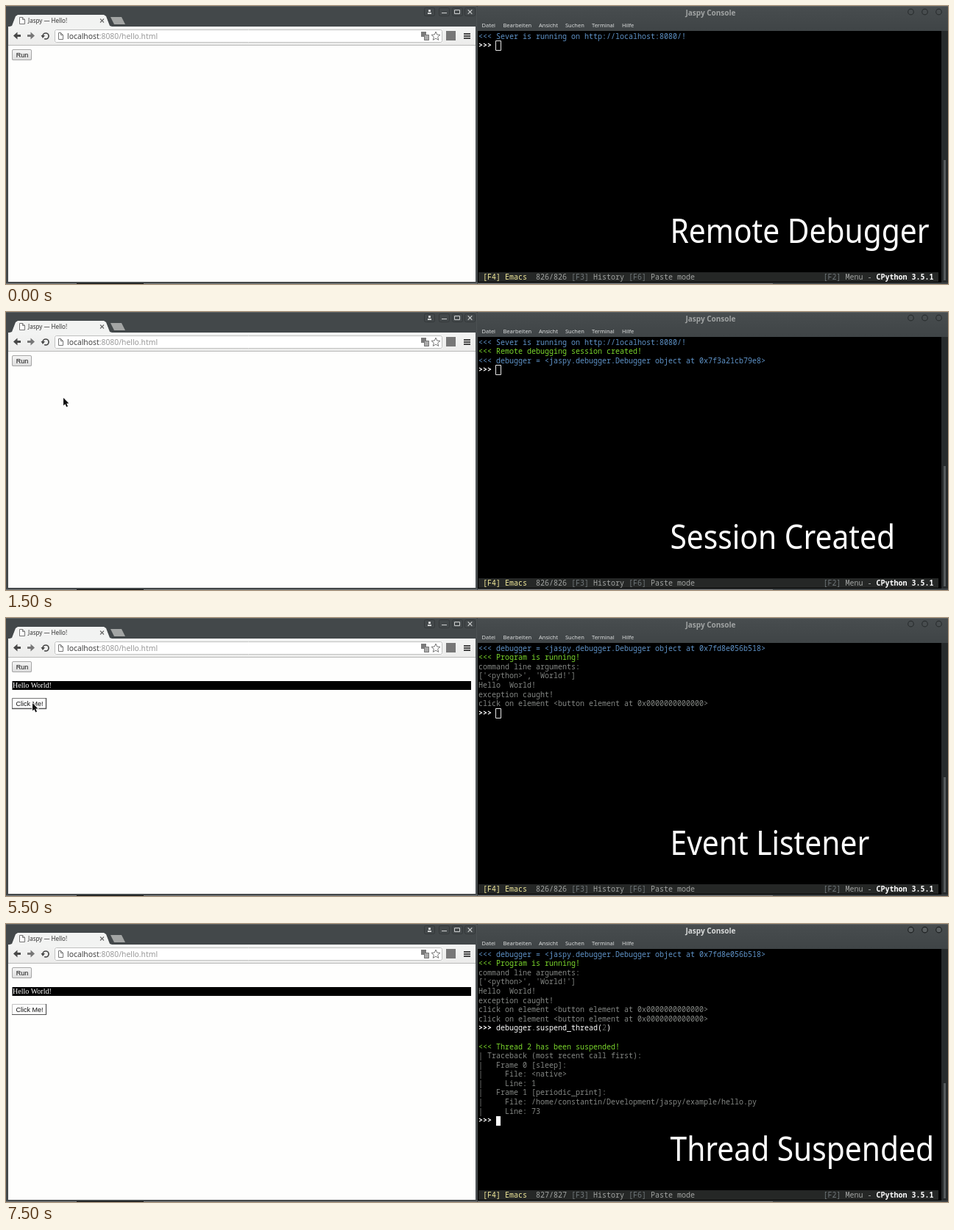
Recreate the animation shown at these times as an HTML page with a canvas. Size 1280 by 379 pixels, loop 8000 ms.

```html
<!DOCTYPE html>
<html lang="en">
<head>
<meta charset="utf-8">
<title>Jaspy remote debugger</title>
<style>
  html, body { margin: 0; width: 100%; height: 100%; overflow: hidden; background: #000; }
  canvas { display: block; width: 1280px; height: 379px; }
</style>
</head>
<body>
<canvas id="stage" width="1280" height="379"></canvas>
<script>
const ctx = document.getElementById('stage').getContext('2d');
const SANS = '"Noto Sans", sans-serif';
const MONO = '"Noto Sans Mono", monospace';
const ARIAL = '"Liberation Sans", sans-serif';
const SERIF = '"Liberation Serif", serif';

const CHAR = 6, ROW = 12.58, LEFT = 642;
const BLUE = '#5f93c8', GREEN = '#7bd72c', GREY = '#848784', WHITE = '#fff';
const LOOP = 8000;
const CONDENSE = .905; // captions are set in a slightly narrow face

const server = [BLUE, '<<< Sever is running on http://localhost:8080/!'];
const prompt = [WHITE, '>>>'];
const click = [GREY, 'click on element <button element at 0x0000000000000>'];
const program = [
  [BLUE, '<<< debugger = <jaspy.debugger.Debugger object at 0x7fd8e056b518>'],
  [GREEN, '<<< Program is running!'],
  [GREY, 'command line arguments:'],
  [GREY, "['<python>', 'World!']"],
  [GREY, 'Hello  World!'],
  [GREY, 'exception caught!']
];
const traceback = [
  '| Traceback (most recent call first):',
  '|   Frame 0 [sleep]:',
  '|     File: <native>',
  '|     Line: 1',
  '|   Frame 1 [periodic_print]:',
  '|     File: /home/constantin/Development/jaspy/example/hello.py',
  '|     Line: 73'
].map(s => [GREY, s]);

const scenes = [
  { at: 0, title: 'Remote Debugger', lines: [server, prompt] },
  { at: 1500, title: 'Session Created', mouse: [78, 117], lines: [
    server,
    [GREEN, '<<< Remote debugging session created!'],
    [BLUE, '<<< debugger = <jaspy.debugger.Debugger object at 0x7f3a21cb79e8>'],
    prompt
  ] },
  { at: 3000, title: 'Run Program', mouse: [21, 68], output: true, hover: 'run',
    lines: [...program, prompt] },
  { at: 5500, title: 'Event Listener', mouse: [36, 116], output: true, hover: 'click',
    lines: [...program, click, prompt] },
  { at: 7500, title: 'Thread Suspended', output: true, focus: true, lines: [
    ...program, click, click,
    [WHITE, '>>>', WHITE, ' debugger', GREY, '.', WHITE, 'suspend_thread(',
      '#5c5f5c', '2', WHITE, ')'],
    [],
    [GREEN, '<<< Thread 2 has been suspended!'],
    ...traceback,
    prompt
  ] }
];

function box(x, y, w, h, color) {
  ctx.fillStyle = color;
  ctx.fillRect(x, y, w, h);
}

function frame(x, y, w, h, color, radius = 0) {
  ctx.strokeStyle = color;
  ctx.lineWidth = 1;
  ctx.beginPath();
  ctx.roundRect(x + .5, y + .5, w - 1, h - 1, radius);
  ctx.stroke();
}

function text(s, x, y, font, color) {
  ctx.font = font;
  ctx.fillStyle = color;
  ctx.fillText(s, x, y);
}

function trace(points, closed) {
  ctx.beginPath();
  points.forEach(([x, y]) => ctx.lineTo(x, y));
  if (closed) ctx.closePath();
}

function shape(points, color) {
  trace(points, true);
  ctx.fillStyle = color;
  ctx.fill();
}

function line(points, color, width = 1, closed = false) {
  trace(points, closed);
  ctx.strokeStyle = color;
  ctx.lineWidth = width;
  ctx.stroke();
}

function shade(y0, y1, from, to) {
  const g = ctx.createLinearGradient(0, y0, 0, y1);
  g.addColorStop(0, from);
  g.addColorStop(1, to);
  return g;
}

function pageIcon(x, y, w, h) {
  const pts = [[x, y], [x + w - 3, y], [x + w, y + 3], [x + w, y + h], [x, y + h]];
  shape(pts, '#fff');
  line(pts, '#777', 1, true);
  line([[x + w - 3, y], [x + w - 3, y + 3], [x + w, y + 3]], '#777');
}

function cross(x, y, r, color, width) {
  line([[x - r, y - r], [x + r, y + r]], color, width);
  line([[x + r, y - r], [x - r, y + r]], color, width);
}

function arrow(x, dir, color) {
  const p = (dx, dy) => [x + dx * dir, 40.5 + dy];
  shape([p(0, 0), p(5.5, -5), p(5.5, -1.6), p(10, -1.6), p(10, 1.6), p(5.5, 1.6), p(5.5, 5)], color);
}

function star(cx, cy, r) {
  const pts = Array.from({ length: 10 }, (_, i) => {
    const a = -Math.PI / 2 + i * Math.PI / 5, d = i % 2 ? r * .45 : r;
    return [cx + d * Math.cos(a), cy + d * Math.sin(a)];
  });
  line(pts, '#777', 1, true);
}

function windowButtons() {
  const icon = '#cfd1d1';
  for (const x of [568, 588, 606, 623]) frame(x, 2, 15, 12, '#34383a', 2);
  box(574, 5, 3, 3, icon);
  box(573, 9, 5, 2, icon);
  box(592, 9, 7, 1, icon);
  frame(609, 5, 8, 6, icon);
  cross(630.5, 8, 2.8, icon, 1.1);
}

function browserChrome() {
  box(0, 0, 641, 379, '#43484a');
  box(0, 0, 640, 1, '#5b6062');
  box(639, 0, 1, 379, '#4c5153');
  windowButtons();

  shape([[5, 28], [8, 27], [13, 14], [16, 12], [133, 12], [136, 14], [141, 27], [144, 28]], '#f2f3f2');
  shape([[142, 15], [157, 15], [162, 25], [147, 25]], '#a3a5a4');
  pageIcon(18.5, 15.5, 7, 9);
  text('Jaspy — Hello!', 30, 23, '8px ' + SANS, '#333');
  cross(130.5, 20, 2.5, '#666', 1.1);

  box(3, 28, 635, 25, shade(28, 53, '#f3f4f3', '#ececeb'));
  box(3, 53, 635, 1, '#b9bab9');
  arrow(10, 1, '#484848');
  arrow(39, -1, '#777');
  ctx.beginPath();
  ctx.arc(54, 41, 4, Math.PI, Math.PI * 2.65);
  ctx.strokeStyle = '#484848';
  ctx.lineWidth = 1.7;
  ctx.stroke();
  shape([[47.5, 40], [53, 40], [50, 44]], '#484848');

  box(66, 32, 527, 18, '#fff');
  frame(66, 32, 527, 18, '#bfc0bf', 2);
  pageIcon(71.5, 36.5, 6, 9);
  const urlFont = '10.35px ' + SANS;
  text('localhost', 83, 44.7, urlFont, '#444');
  const hostEnd = 83 + ctx.measureText('localhost').width;
  text(':8080/hello.html', hostEnd, 44.7, urlFont, '#999');
  box(564, 35, 7, 7, '#7b7b7b');
  box(568, 39, 7, 8, '#aaa');
  frame(568, 39, 7, 8, '#777');
  star(584, 41.3, 6.3);
  box(598, 34, 13, 13, '#777');
  for (const y of [37, 40, 43]) box(622, y, 9, 2, '#454545');

  box(3, 54, 635, 322, '#fefefd');
  box(0, 378, 640, 1, '#77797a');
  box(96, 378, 91, 1, '#111');
}

function page(s) {
  box(8, 59, 27, 15, shade(59, 74, '#f6f6f6', '#dcdcdc'));
  frame(8, 59, 27, 15, s.hover === 'run' ? '#888' : '#a5a5a5', 1.5);
  text('Run', 13.7, 70.4, '9px ' + ARIAL, '#111');
  if (!s.output) return;

  box(8.5, 86, 623.5, 12, '#000');
  text('Hello World!', 9, 95.4, '10px ' + SERIF, '#fff');

  const over = s.hover === 'click';
  box(8, 109, 47, 15, '#fefefe');
  frame(8, 109, 47, 15, over ? '#777' : '#c2c2c2');
  line([[8, 123.5], [54.5, 123.5], [54.5, 109]], '#555', over ? 1.4 : 1.2);
  text('Click Me!', 13.5, 120.4, '9px ' + ARIAL, '#111');
}

function pointer([x, y]) {
  const pts = [[0, 0], [0, 10.5], [2.4, 8.4], [4.2, 12.4], [6, 11.6], [4.3, 7.7], [7.4, 7.5]]
    .map(([dx, dy]) => [x + dx, y + dy]);
  line(pts, '#fff', 1.4, true);
  shape(pts, '#111');
}

function runs(parts, x, y) {
  for (let i = 0; i < parts.length; i += 2) {
    const s = parts[i + 1];
    const weight = s === '>>>' || s.startsWith('CPython') ? 'bold ' : '';
    text(s, x, y, weight + '10px ' + MONO, parts[i]);
    x += s.length * CHAR;
  }
}

function terminalHeader(focus) {
  box(641, 0, 639, 34, shade(0, 34, '#484d4f', '#3f4446'));
  box(641, 0, 639, 1, '#5b6062');
  text('Jaspy Console', 923.5, 13.3, 'bold 10px ' + SANS, focus ? '#d8dada' : '#a0a3a3');
  for (const x of [1229.5, 1248.5, 1267.5]) {
    ctx.beginPath();
    ctx.arc(x, 8, 3.8, 0, 7);
    ctx.fillStyle = focus ? '#5a5f61' : '#484d4f';
    ctx.fill();
    ctx.strokeStyle = focus ? '#1d2021' : '#2b2f30';
    ctx.lineWidth = 1.2;
    ctx.stroke();
  }
  const menu = { Datei: 646.5, Bearbeiten: 675.5, Ansicht: 724, Suchen: 760, Terminal: 796, Hilfe: 837 };
  for (const name in menu) text(name, menu[name], 28.8, '7.5px ' + SANS, '#dcdede');
}

function statusBar(count) {
  const dim = '#70777a', label = '#a2a4a2';
  box(642, 363, 625, 13, '#252726');
  runs(['#f3eb9b', '[F4] Emacs  ', label, count + ' ', dim, '[F3]', label, ' History ',
    dim, '[F6]', label, ' Paste mode'], 648, 373.3);
  runs([dim, '[F2]', label, ' Menu - ', WHITE, 'CPython 3.5.1'], 1110.5, 373.3);
}

function caption(title) {
  ctx.save();
  ctx.translate(902.5, 323);
  ctx.scale(CONDENSE, 1);
  text(title, 0, 0, '45px ' + SANS, WHITE);
  ctx.restore();
}

function terminal(s) {
  terminalHeader(s.focus);
  box(641, 34, 630, 343, '#000');
  box(1271, 34, 9, 343, '#272b2c');
  const top = s.output ? 217 : 210;
  box(1274, top, 3, 374 - top, '#555a5c');
  box(641, 377, 639, 2, '#3f4446');
  box(641, 378, 401, 1, '#777');

  s.lines.forEach((parts, i) => runs(parts, LEFT, 44.7 + i * ROW));
  const y = Math.floor(35 + (s.lines.length - 1) * ROW);
  if (s.focus) box(666, y + 1, 6, 13, WHITE);
  else frame(665, y, 8, 14, '#e6e6e6');

  statusBar(s.focus ? '827/827' : '826/826');
  caption(s.title);
}

function draw(now) {
  const t = now % LOOP;
  const s = scenes.findLast(scene => scene.at <= t);
  browserChrome();
  page(s);
  terminal(s);
  if (s.mouse) pointer(s.mouse);
}

const start = performance.now();
function tick() {
  draw(performance.now() - start);
  requestAnimationFrame(tick);
}
tick();
</script>
</body>
</html>
```
